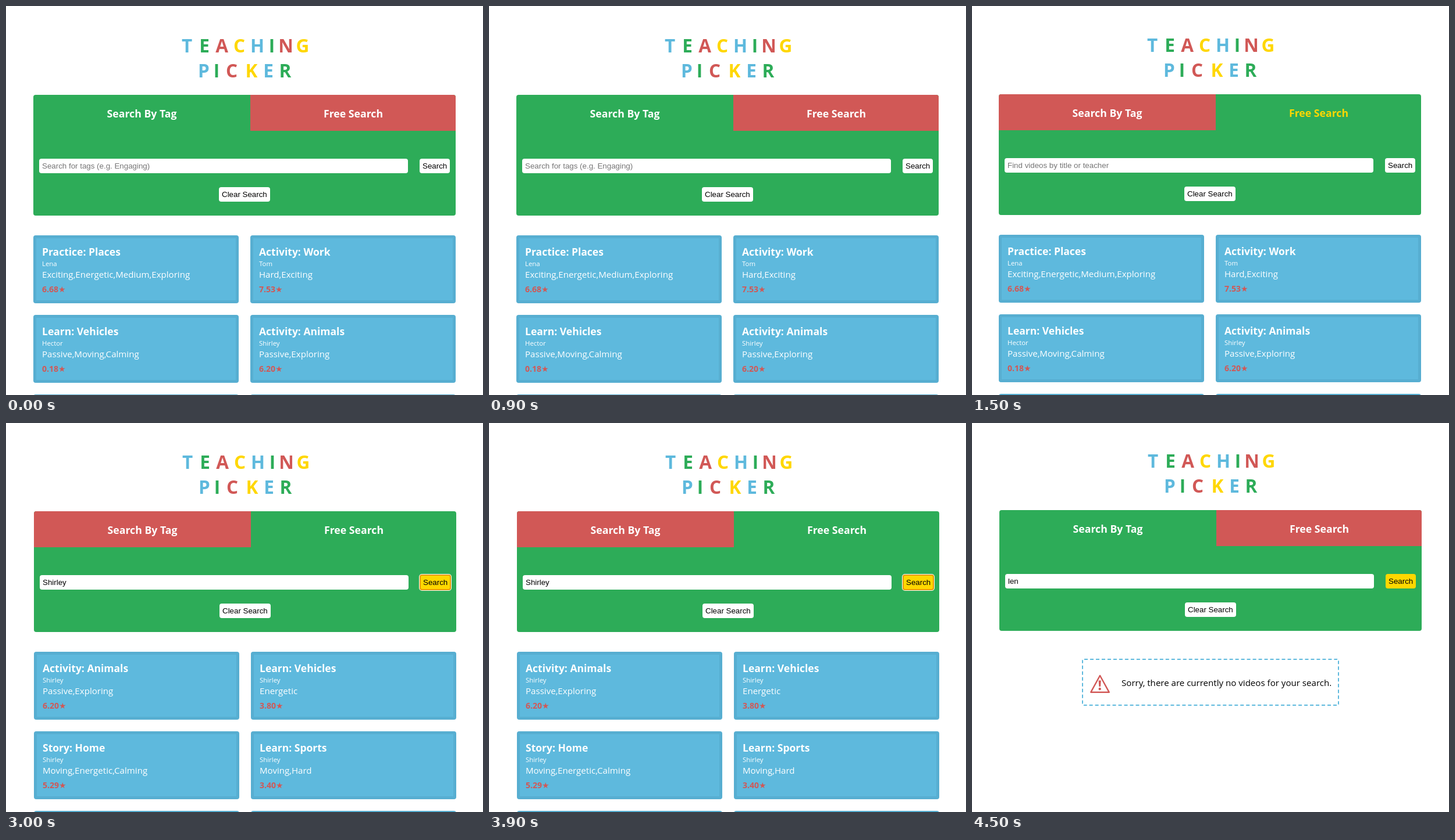
These frames come from a looping animation (820x670 px, 6 s). An HTML page:

```html
<!DOCTYPE html>
<html lang="en">
<head>
<meta charset="utf-8">
<title>Teaching Picker</title>
<style>
  html, body { margin: 0; width: 100%; height: 100%; overflow: hidden; background: #fff; }
  #stage { display: block; width: 820px; height: 670px; }
  text { font-family: "Open Sans", "Noto Sans", sans-serif; font-size: 15.08px; white-space: pre; }
  .logo { font-size: 31.5px; font-weight: 700; text-anchor: middle; }
  .tab { font-size: 17.7px; font-weight: 700; text-anchor: middle; }
  .head { font-size: 17.5px; font-weight: 700; fill: #fff; }
  .who { font-size: 11.4px; fill: #fff; }
  .tags { fill: #fff; }
  .rate { font-size: 14px; font-weight: 700; fill: #d15856; }
  .star { font-family: "DejaVu Sans", sans-serif; }
  .form { font-family: "Liberation Sans", Arial, sans-serif; font-size: 13.333px; }
  .scene { visibility: hidden; animation: show 6s step-end infinite; }
  @keyframes show {
    0% { visibility: visible; }
    25%, 100% { visibility: hidden; }
  }
</style>
</head>
<body>
<svg id="stage" viewBox="0 0 820 670"></svg>
<script>
const BLUE = '#5eb9dd', EDGE = '#57aed1', GREEN = '#2dac58', RED = '#d15856', GOLD = '#ffd700';

const rect = (x, y, w, h, fill, r = 0) =>
  `<rect x="${x}" y="${y}" width="${w}" height="${h}" rx="${r}" fill="${fill}"/>`;
const text = (x, y, str, cls, fill) =>
  `<text x="${x}" y="${y}" class="${cls}"${fill ? ` fill="${fill}"` : ''}>${str}</text>`;

const letters = [...'TEACHINGPICKER'];
const slots = [311, 341, 371, 401, 432, 457, 481, 510, 340, 362, 388, 422, 451, 480];
const logo = letters.map((c, i) =>
  text(slots[i], i < 8 ? 80 : 123, c, 'logo', [BLUE, GREEN, RED, GOLD][i % 4])).join('');

function searchButton(state) {
  const label = text(716, 280, 'Search', 'form');
  if (state === 'focus') {
    return rect(709, 261, 56, 29, '#fff', 5) + rect(710, 262, 54, 27, '#e59700', 4)
      + rect(712, 264, 50, 23, GOLD, 2) + label;
  }
  return rect(711, 263, 52, 25, state ? GOLD : '#fff', 4) + label;
}

function panel({ byTag, hover, query, hint, button }) {
  const idleTab = byTag
    ? 'M420 153H769a4 4 0 0 1 4 4V215H420z'
    : 'M47 215V157a4 4 0 0 1 4-4H420V215z';
  return rect(47, 153, 726, 208, GREEN, 4)
    + `<path d="${idleTab}" fill="${RED}"/>`
    + text(233.5, 192, 'Search By Tag', 'tab', '#fff')
    + text(597, 192, 'Free Search', 'tab', hover ? GOLD : '#fff')
    + rect(57, 263, 634, 25, '#fff', 4)
    + text(62, 280, query || hint, 'form', query ? '#000' : '#757575')
    + searchButton(button)
    + rect(366, 312, 88, 25, '#fff', 4)
    + text(371, 329, 'Clear Search', 'form');
}

function card(info, i) {
  const x = 47 + (i % 2) * 373, y = 395 + (i >> 1) * 137;
  const base = rect(x, y, 353, 117, EDGE, 4) + rect(x + 5, y + 5, 343, 107, BLUE);
  if (!info) return base;
  const [head, who, tags, rate] = info;
  return base
    + text(x + 15, y + 35, head, 'head')
    + text(x + 15, y + 53, who, 'who')
    + text(x + 15, y + 73, tags, 'tags')
    + text(x + 15, y + 98, `${rate}<tspan class="star">★</tspan>`, 'rate');
}

// Two blank cards peek in at the bottom edge.
const cards = list => [...list, null, null].map(card).join('');

// The nested viewport clips the outer half of the dashed stroke.
const notice =
  `<svg x="189" y="409" width="442" height="81"><rect width="442" height="81" rx="4" fill="none"
    stroke="${BLUE}" stroke-width="4" pathLength="1040" stroke-dasharray="6 4"/></svg>`
  + `<path d="M220 438L204.3 466.7H235.7z" fill="none" stroke="${RED}" stroke-width="2.4" stroke-linejoin="round"/>`
  + `<path d="M217.6 446.5h4.2l-.8 10.5h-2.6z" fill="${RED}"/>`
  + `<circle cx="219.7" cy="461" r="2.2" fill="${RED}"/>`
  + text(257, 456, 'Sorry, there are currently no videos for your search.', 'note');

const all = [
  ['Practice: Places', 'Lena', 'Exciting,Energetic,Medium,Exploring', '6.68'],
  ['Activity: Work', 'Tom', 'Hard,Exciting', '7.53'],
  ['Learn: Vehicles', 'Hector', 'Passive,Moving,Calming', '0.18'],
  ['Activity: Animals', 'Shirley', 'Passive,Exploring', '6.20']
];
const found = [
  all[3],
  ['Learn: Vehicles', 'Shirley', 'Energetic', '3.80'],
  ['Story: Home', 'Shirley', 'Moving,Energetic,Calming', '5.29'],
  ['Learn: Sports', 'Shirley', 'Moving,Hard', '3.40']
];

const scenes = [
  { at: [0, 0], byTag: true, hint: 'Search for tags (e.g. Engaging)', body: cards(all) },
  { at: [-1, -1], hover: true, hint: 'Find videos by title or teacher', body: cards(all) },
  { at: [1, -1], query: 'Shirley', button: 'focus', body: cards(found) },
  { at: [0, -3], byTag: true, query: 'len', button: 'hover', body: notice }
];

document.getElementById('stage').innerHTML = scenes.map((s, i) =>
  `<g class="scene" style="animation-delay:${i * 1.5 - 6}s" transform="translate(${s.at})">`
  + logo + panel(s) + s.body + '</g>').join('');
</script>
</body>
</html>
```
